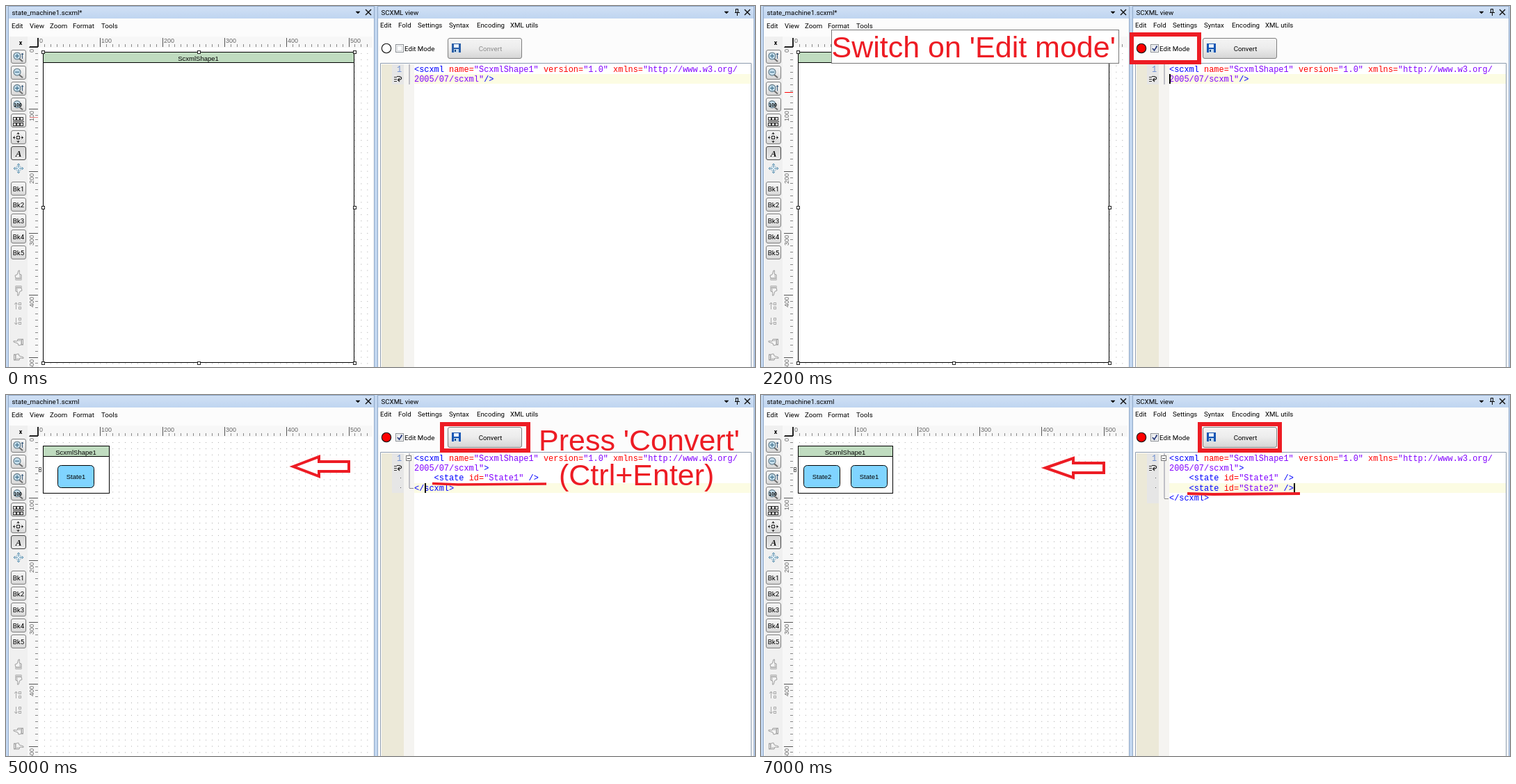
An HTML page with a canvas that plays this animation: 1077x520 px, repeating every 8 s.

```html
<!DOCTYPE html>
<html>
<head>
<meta charset="utf-8">
<style>
html, body { margin: 0; width: 100%; height: 100%; overflow: hidden; }
canvas { display: block; }
</style>
</head>
<body>
<canvas id="stage" width="1077" height="520"></canvas>
<script>
const c = document.getElementById('stage').getContext('2d');
const UI = '9.7px Roboto, sans-serif';
const ARIAL = '9.5px "Liberation Sans", Arial, sans-serif';
const BIG = '43px "Liberation Sans", Arial, sans-serif';
const MONO = '11.92px "Liberation Mono", "Courier New", monospace';
const RED = '#ed1c24', UNIT = 8.93, LINE = 14.3, CHAR = 7.153;

function fill(x, y, w, h, color) {
  c.fillStyle = color;
  c.fillRect(x, y, w, h);
}
function frame(x, y, w, h, color = '#000', width = 1) {
  c.strokeStyle = color;
  c.lineWidth = width;
  c.strokeRect(x, y, w, h);
}
function path(points, color = '#000', width = 1, inside) {
  c.beginPath();
  points.forEach(([x, y]) => c.lineTo(x, y));
  if (inside) { c.closePath(); c.fillStyle = inside; c.fill(); }
  c.strokeStyle = color;
  c.lineWidth = width;
  c.stroke();
}
function text(str, x, y, font = UI, color = '#000', align = 'left') {
  c.font = font;
  c.fillStyle = color;
  c.textAlign = align;
  c.fillText(str, x, y);
}
function circle(x, y, r, inside, color = '#000', width = 1) {
  c.beginPath();
  c.arc(x, y, r, 0, 7);
  c.fillStyle = inside;
  c.fill();
  c.strokeStyle = color;
  c.lineWidth = width;
  c.stroke();
}
function round(x, y, w, h, r, inside, color) {
  c.beginPath();
  c.roundRect(x, y, w, h, r);
  c.fillStyle = inside;
  c.fill();
  c.strokeStyle = color;
  c.lineWidth = 1;
  c.stroke();
}
function turned(x, y, angle, paint) {
  c.save();
  c.translate(x, y);
  c.rotate(angle);
  paint();
  c.restore();
}
function button(x, y, w, h, pressed) {
  const g = c.createLinearGradient(0, y, 0, y + h);
  g.addColorStop(0, pressed ? '#d4d4d4' : '#f5f5f5');
  g.addColorStop(0.5, pressed ? '#dedede' : '#ececec');
  g.addColorStop(1, pressed ? '#ebebeb' : '#d6d6d6');
  round(x + .5, y + .5, w, h, 2.5, g, pressed ? '#444' : '#808080');
}

function titleBar(x, w, title, menu, baseline) {
  const g = c.createLinearGradient(0, 1, 0, 18);
  g.addColorStop(0, '#d0e0f5');
  g.addColorStop(1, '#bfd5f0');
  fill(x, 1, w, 17, g);
  fill(x, 18, w, 502, '#fcfcfc');
  text(title, x + 4.5, 13);
  menu.forEach(([name, mx]) => text(name, mx, baseline));
}
function titleIcons(triangle, cross) {
  path([[triangle - 3, 8], [triangle + 3, 8], [triangle, 11]], '#000', .5, '#000');
  path([[cross - 4, 5], [cross + 4, 13]], '#111', 1.4);
  path([[cross + 4, 5], [cross - 4, 13]], '#111', 1.4);
}

function magnifier(y, mark) {
  path([[18, y + 2], [24, y + 7]], '#6b6b6b', 2);
  circle(16, y - 1, 5, '#c3dcea', '#5d7684', 1.1);
  if (mark === '100') return text(mark, 17, y + 2, 'bold 7px "Liberation Sans", sans-serif', '#000', 'center');
  path([[13, y - 1], [19, y - 1]], '#3f6f8c', 1.2);
  if (mark === '-') return;
  path([[16, y - 4], [16, y + 2]], '#3f6f8c', 1.2);
  path([[23.5, y - 5], [23.5, y + 3]], '#357', 1);
  path([[22, y - 3], [23.5, y - 5], [25, y - 3]], '#357', 1);
}
function hand(y, angle) {
  turned(18, y, angle, () => {
    path([[-4, 4], [-5, 0], [-2, -1], [0, -7], [1.5, -7], [1, -2], [4, -1], [4, 4]], '#a0a0a0', 1, '#f4f4f4');
    path([[1, 0], [4, 0]], '#b0b0b0');
    path([[1, 2], [4, 2]], '#b0b0b0');
    frame(-4, 4.5, 8, 2, '#a0a0a0');
  });
}
function moveIcon(y, dir) {
  path([[14.5, y - 5], [14.5, y + 5]], '#aaa');
  path([[12, y - dir * 2], [14.5, y - dir * 5], [17, y - dir * 2]], '#aaa');
  frame(18.5, y - 4.5, 3, 3, '#aaa');
  frame(18.5, y + 1.5, 3, 3, '#aaa');
}
function toolbar() {
  fill(5, 44, 26, 476, '#f0f0f0');
  text('x', 21, 56, 'bold 9px Roboto, sans-serif', '#000', 'center');
  for (let i = 0; i < 7; i++) button(7, 63 + i * 23.2 | 0, 21, 19, i === 6);
  ['+', '-', '+', '100'].forEach((m, i) => magnifier(73 + i * 23.2, m));
  for (let i = 0; i < 3; i++) {
    frame(10.5 + i * 5, 160.5, 4, 4, '#333');
    frame(10.5 + i * 5, 168.5, 4, 4, '#333');
  }
  path([[10, 166.5], [26, 166.5]], '#333');
  frame(15.5, 187.5, 4, 4, '#222');
  circle(18, 234, 4, '#e8f2f8', '#a9c0ce');
  for (let i = 0; i < 4; i++) {
    turned(17.5, 189.5, i * Math.PI / 2, () => {
      path([[4, 0], [7, 0]], '#222');
      path([[5, -2], [7, 0], [5, 2]], '#222');
    });
    turned(18, 234, i * Math.PI / 2, () => {
      path([[1, 0], [7, 0]], '#5c93b3');
      path([[5, -2], [7, 0], [5, 2]], '#5c93b3');
    });
  }
  text('A', 18, 217, 'bold italic 13px "Liberation Serif", serif', '#111', 'center');
  for (let i = 0; i < 5; i++) {
    const y = 253 + i * 23.2 | 0;
    button(7, y, 21, 19);
    text('Bk' + (i + 1), 18, y + 14, UI, '#000', 'center');
  }
  hand(388, 0);
  hand(410, Math.PI);
  moveIcon(432, 1);
  moveIcon(454, -1);
  hand(484, -Math.PI / 2);
  hand(506, Math.PI / 2);
}

function rulers(scene) {
  fill(31, 44, 496, 16, '#f7f7f7');
  fill(31, 44, 16, 476, '#f7f7f7');
  const small = '9px "Liberation Sans", Arial, sans-serif';
  for (let i = 0; i < 54; i++) {
    const d = Math.round(i * UNIT), major = i % 10 === 0;
    const len = major ? 13 : 4, color = major ? '#555' : '#888';
    fill(46 + d, 59 - len, 1, len, color);
    fill(46 - len, 59 + d, len, 1, color);
    if (!major) continue;
    text(i * 10, 48 + d, 53, small, '#666');
    turned(40, 62 + d, -Math.PI / 2, () => text(i * 10, 0, 0, small, '#666', 'right'));
  }
  fill(45, 46, 2, 13, '#222');
  fill(34, 58, 12, 2, '#222');
  if (scene === 0) fill(34, 160, 12, 1, '#e88');
  if (scene === 1) fill(34, 124, 12, 1, '#f00');
  if (scene === 2) fill(35, 209, 11, 1, '#222');
}

function container(x, y, w, h, label) {
  fill(x, y, w, h, '#fff');
  fill(x, y, w, 15, '#c0dcc0');
  frame(x + .5, y + .5, w, h);
  path([[x, y + 15.5], [x + w, y + 15.5]]);
  text(label, x + w / 2, y + 13, ARIAL, '#000', 'center');
}
function state(x, label) {
  round(x + .5, 101.5, 52, 32, 5, '#80d4ff', '#000');
  text(label, x + 26.5, 121, ARIAL, '#000', 'center');
}
function diagram(scene) {
  fill(47, 60, 480, 460, '#fff');
  for (let x = 1; x < 54; x++)
    for (let y = 1; y < 52; y++)
      fill(46 + x * UNIT, 59 + y * UNIT, 1, 1, '#a8a8a8');
  if (scene < 3) {
    container(53, 66, 447, 447, scene === 2 ? 'ScxmlShape2' : 'ScxmlShape1');
    if (scene === 2) return;
    for (const x of [53, 277, 501])
      for (const y of [66, 290, 514]) {
        if (x === 277 && y === 290) continue;
        fill(x - 2, y - 2, 5, 5, '#fff');
        frame(x - 1.5, y - 1.5, 4, 4, '#222');
      }
    return;
  }
  container(53, 73, scene === 3 ? 95 : 136, 68, 'ScxmlShape1');
  frame(47.5, 104.5, 3, 6, '#666');
  fill(48, 107, 2, 1, '#444');
  if (scene === 3) state(74, 'State1');
  else { state(61, 'State2'); state(129, 'State1'); }
}

function controls(scene) {
  circle(547, 61, 6.7, scene ? '#f00' : '#fff', '#111', 1.1);
  fill(560, 55, 12, 12, '#fff');
  frame(560.5, 55.5, 11, 11, '#8a8f94');
  frame(562.5, 57.5, 7, 7, '#d0d4d8');
  if (scene) path([[563, 61], [565.5, 64], [569.5, 57.5]], '#2d3e7d', 1.8);
  text('Edit Mode', 573, 65);
  button(635, 46, 106, 29);
  fill(641, 54, 13, 13, scene ? '#1656b4' : '#2a5fa8');
  fill(644, 55, 7, 5, '#e8f1fb');
  fill(644, 62, 7, 5, '#c2d8ee');
  fill(645, 63, 2, 3, '#164680');
  text('Convert', 696.5, 65, UI, scene ? '#000' : '#8c8c8c', 'center');
}

const STYLES = { tag: '#0000ff', attr: '#ff0000', value: '#8000ff' };
function code(row, indent, source) {
  let x = 587 + indent * CHAR;
  for (const part of source.match(/"[^"]*"?|[\w/]+"|<\/?\w+>?|\/?>|\w+=|\s+/g)) {
    const kind = /"/.test(part) ? 'value' : /=/.test(part) ? 'attr' : 'tag';
    text(part, x, 94.8 + row * LINE, MONO, STYLES[kind]);
    x += part.length * CHAR;
  }
}
function wrapMark() {
  for (const y of [102.5, 105.5, 108.5]) path([[558, y], [562, y]], '#333');
  path([[562, 101.5], [566, 101.5], [568.5, 103], [568.5, 105], [566, 106.5], [563, 106.5]], '#222', 1.2);
  path([[566, 104], [563.5, 106.5], [566, 109]], '#222', 1.2);
}
function editor(scene) {
  const rows = [2, 2, 4, 4, 5][scene], bottom = Math.round(84 + rows * LINE);
  fill(538, 82, 534, 438, '#fff');
  path([[538.5, 520], [538.5, 82.5], [1071.5, 82.5], [1071.5, 520]], '#8e9cae');
  fill(540, 84, 32, 436, '#ece9d8');
  fill(555, 84, 17, bottom - 84, '#e6e6e6');
  fill(572, 84, 15, 436, '#f5f4f1');
  fill(587, scene < 2 ? 98 : 127, 484, 14, '#fcfce3');
  text('1', 562, 94.8, MONO, '#6f8fd0');
  wrapMark();
  path([[580, 84], [580, scene < 2 ? bottom : bottom - 7]], '#8a8a9c');
  code(0, 0, '<scxml name="ScxmlShape1" version="1.0" xmlns="http://www.w3.org/');
  code(1, 0, scene < 2 ? '2005/07/scxml"/>' : '2005/07/scxml">');
  if (scene > 1) {
    fill(575, 87, 8, 8, '#fff');
    frame(575.5, 87.5, 7, 7, '#777');
    fill(577, 91, 4, 1, '#444');
    path([[580, bottom - 6.5], [586, bottom - 6.5]], '#888');
    fill(567, 119, 1, 1, '#555');
    fill(567, 133, 1, 1, '#555');
    code(2, 4, '<state id="State1" />');
    if (scene === 4) code(3, 4, '<state id="State2" />');
    code(rows - 1, 0, '</scxml>');
  }
  if (scene === 1) fill(587, 98, 2, 14, '#000');
  if (scene === 3) fill(602, 127, 2, 14, '#000');
  if (scene === 4) fill(766, 127, 2, 14, '#000');
}

function arrow(x, y, neck, half) {
  path([[x, y], [neck, y - half], [neck, y - 7], [493, y - 7], [493, y + 7],
    [neck, y + 7], [neck, y + half]], RED, 4, '#fff');
}
const notes = [
  () => {},
  () => {
    fill(101, 34, 414, 49, '#fff');
    frame(101.5, 34.5, 413, 48, '#777');
    text("Switch on 'Edit mode'", 101.5, 74, BIG, RED);
    frame(533, 41, 97, 40, RED, 6);
  },
  () => {
    frame(604.5, 104.5, 176, 27, RED, 5);
    text('Edit SCXML', 809, 133, BIG, RED);
  },
  () => {
    arrow(413, 103, 450, 14);
    frame(627, 42, 124, 38, RED, 6);
    text("Press 'Convert'", 766, 79.5, BIG, RED);
    text('(Ctrl+Enter)', 795, 130, BIG, RED);
    path([[613, 127.5], [650, 129], [777, 128]], RED, 3.5);
  },
  () => {
    arrow(409, 105, 449, 14);
    frame(631, 42, 115, 38, RED, 6);
    path([[613, 142], [650, 143], [775, 142]], RED, 4);
  }
];

function draw(scene) {
  fill(0, 0, 1077, 520, '#c3d7f0');
  titleBar(4, 525, 'state_machine1.scxml' + (scene < 2 ? '*' : ''),
    [['Edit', 8], ['View', 34], ['Zoom', 63], ['Format', 96], ['Tools', 137]], 32);
  titleBar(535, 540, 'SCXML view', [['Edit', 538], ['Fold', 564], ['Settings', 592],
    ['Syntax', 637], ['Encoding', 677], ['XML utils', 725]], 31);
  for (const x of [3, 529, 534, 1075]) fill(x, 0, 1, 520, '#91a9c8');
  fill(3, 0, 527, 1, '#91a9c8');
  fill(534, 0, 542, 1, '#91a9c8');
  titleIcons(506, 521);
  titleIcons(1036, 1066);
  frame(1049.5, 4.5, 3, 5);
  path([[1048, 9.5], [1055, 9.5]]);
  path([[1051.5, 10], [1051.5, 14]]);
  toolbar();
  diagram(scene);
  rulers(scene);
  controls(scene);
  editor(scene);
  notes[scene]();
}

const CUTS = [1000, 3000, 5000, 7000];
function tick() {
  const t = performance.now() % 8000;
  draw(CUTS.filter(cut => t >= cut).length);
  requestAnimationFrame(tick);
}
tick();
</script>
</body>
</html>
```
